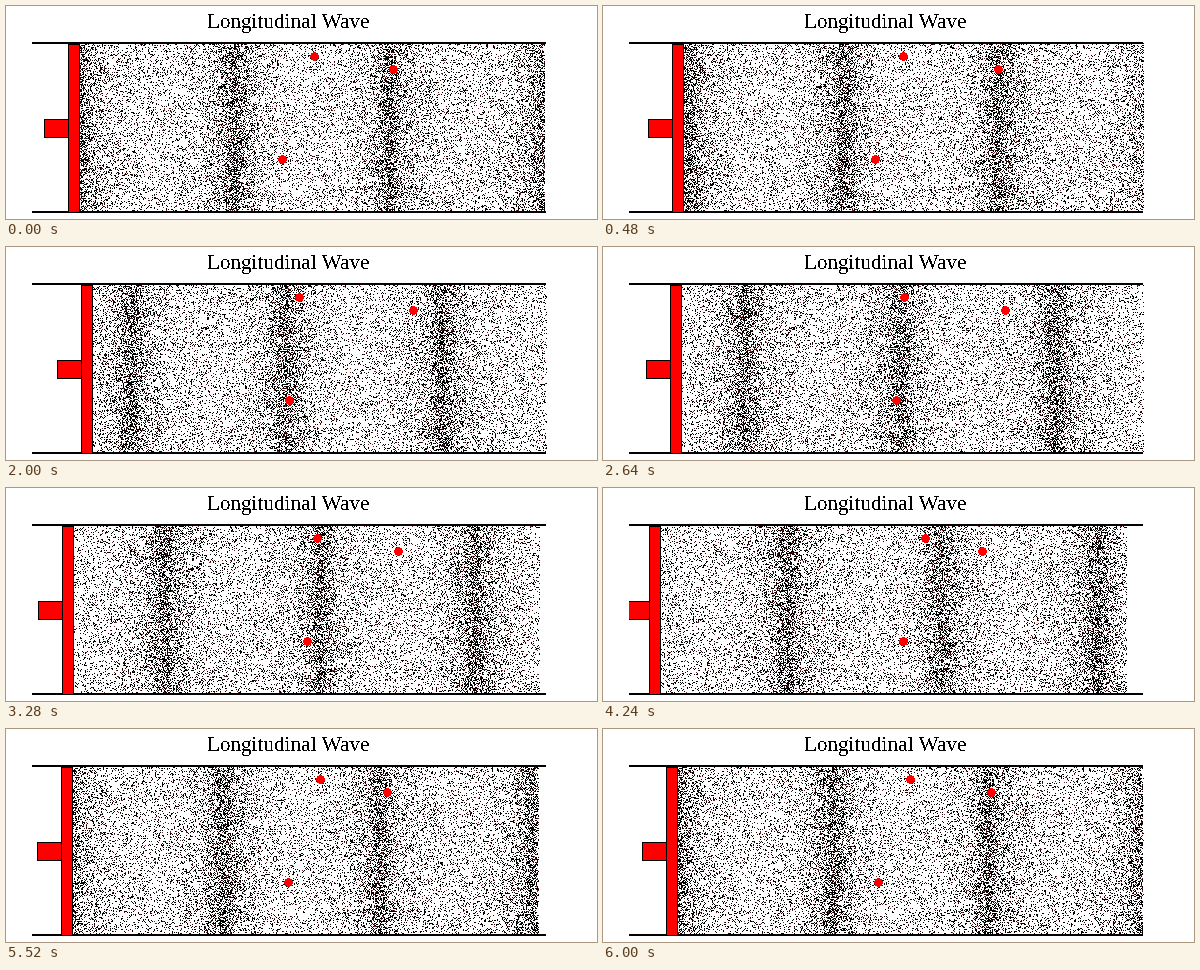
Write a matplotlib script that moves like this. It is 591 px wide and 213 px high and loops after 6.08 s.

```python
import numpy as np
import matplotlib.pyplot as plt
from matplotlib.animation import FuncAnimation
from matplotlib.patches import Circle, Rectangle

W, H, DPI = 591, 213, 64
PX = 72 / DPI                      # one pixel in points
FRAMES, INTERVAL = 76, 80

LEFT, RIGHT, TOP, BOTTOM = 26, 541, 37, 205
REST, LENGTH = 73, 466             # medium at rest: three wavelengths
AMP = 15.5
OMEGA = 2 * np.pi / 74.2           # radians per frame
K = 2 * np.pi * 3 / LENGTH
PISTON_W, ROD_W = 12, 24
N_DOTS = 22000
RED = "#ff0000"

plt.rcParams["text.antialiased"] = False

rng = np.random.default_rng(7)
dot_x = REST + LENGTH * rng.random(N_DOTS)
dot_y = rng.integers(0, BOTTOM - TOP, N_DOTS)
dot_rgb = np.where(rng.random(N_DOTS)[:, None] < 0.12, (104, 40, 40), (0, 0, 0))
tracers = [(307, 50), (392, 63), (287, 153)]


def moved(x, n):
    """Position at frame n of a particle resting at x."""
    return x + AMP * np.sin(OMEGA * n - K * (x - REST))


def medium(n):
    img = np.full((BOTTOM - TOP, RIGHT - LEFT, 3), 255, np.uint8)
    col = np.floor(moved(dot_x, n)).astype(int) - LEFT
    seen = col < RIGHT - LEFT
    img[dot_y[seen], col[seen]] = dot_rgb[seen]
    return img


fig = plt.figure(figsize=(W / DPI, H / DPI), dpi=DPI, facecolor="white")
ax = fig.add_axes([0, 0, 1, 1])

field = ax.imshow(medium(0), extent=(LEFT, RIGHT, BOTTOM, TOP),
                  interpolation="nearest", aspect="auto", zorder=1)
ax.set(xlim=(0, W), ylim=(H, 0))
ax.axis("off")

for y in (37, 206):
    ax.add_patch(Rectangle((LEFT, y - 1), RIGHT - LEFT - 1, 2,
                           fc="black", lw=0, zorder=2))

ax.text(282, 22, "Longitudinal Wave", family=["Liberation Serif", "DejaVu Serif"],
        size=21.3 * PX, ha="center", va="baseline")


def red_box(y, w, h):
    box = Rectangle((0, y), w, h, fc=RED, ec="black", lw=PX,
                    antialiased=False, zorder=4)
    return ax.add_patch(box)


rod = red_box(112.5, ROD_W, 18)
piston = red_box(37.5, PISTON_W - 1, 168)
rod.set_clip_path(Rectangle((LEFT, 0), W, H, transform=ax.transData))
marks = [ax.add_patch(Circle((x, y + 0.5), 3.6, fc=RED, lw=0,
                             antialiased=False, zorder=3))
         for x, y in tracers]


def update(n):
    field.set_data(medium(n))
    x = np.floor(moved(REST, n)) - PISTON_W + 0.5
    piston.set_x(x)
    rod.set_x(x - ROD_W)
    for mark, (x0, y) in zip(marks, tracers):
        mark.center = (np.round(moved(x0, n)) + 0.5, y + 0.5)
    return [field, piston, rod, *marks]


anim = FuncAnimation(fig, update, frames=FRAMES, interval=INTERVAL,
                     repeat=True, repeat_delay=0, blit=False)
plt.show()
```
